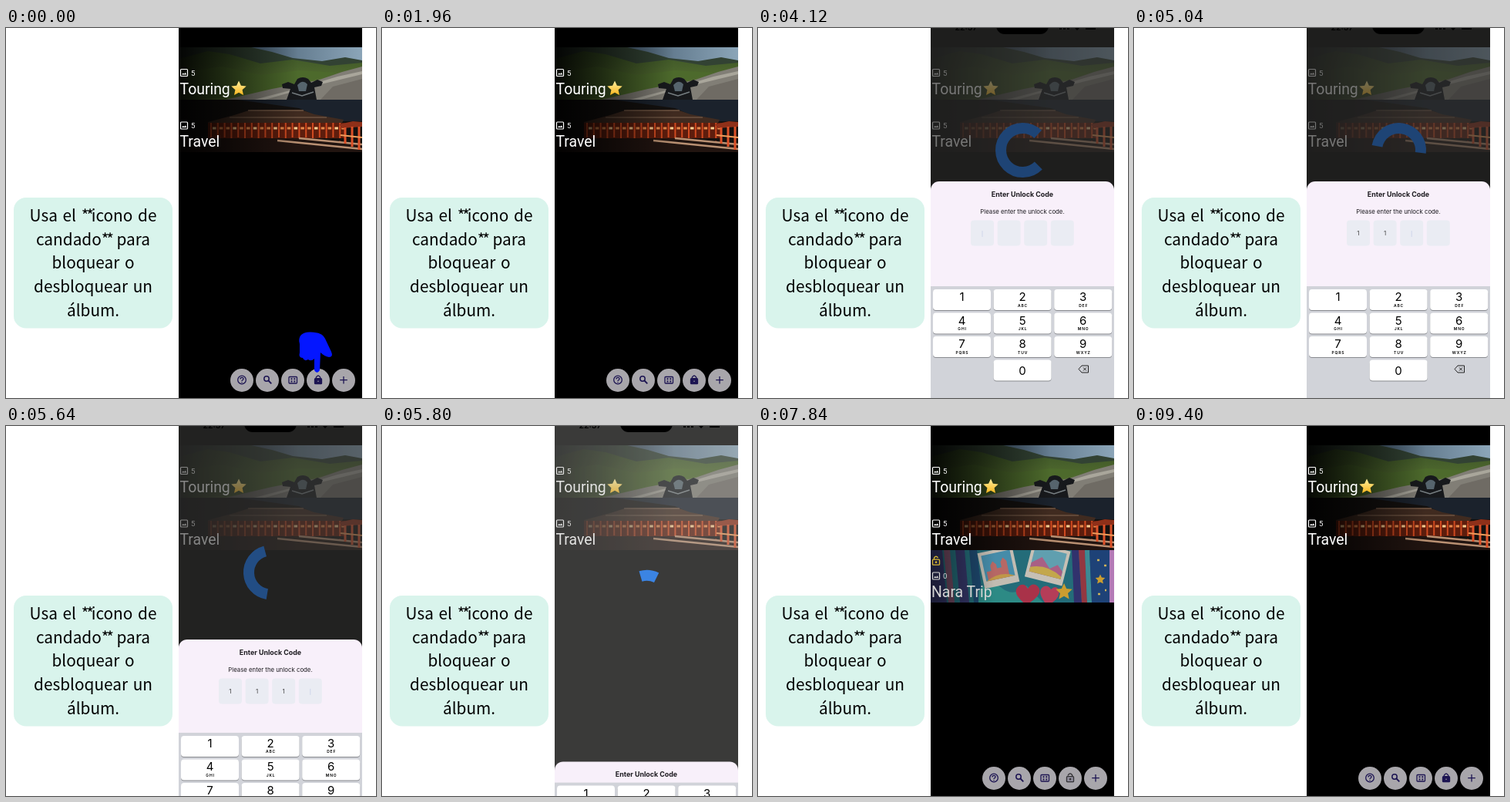
Animation of 480 by 480 pixels, one loop 9.88 s. Source, as an HTML page:

```html
<!DOCTYPE html>
<html lang="es">
<head>
<meta charset="utf-8">
<title>Bloquear un álbum</title>
<style>
html, body { margin: 0; width: 100%; height: 100%; overflow: hidden; background: #fff; }
svg { display: block; width: 100vw; height: 100vh; }
.tip { font: 20.8px "Noto Sans CJK JP", "Noto Sans CJK", "Noto Sans", sans-serif; word-spacing: 2px; text-anchor: middle; }
.stars { letter-spacing: -3.2px; }
.name { font: 19.4px Roboto, sans-serif; fill: #fff; }
.count { font: 9.5px Roboto, sans-serif; fill: #fff; }
.clock { font: 600 10.5px Inter, sans-serif; }
.mid { text-anchor: middle; }
.title { font: 700 8.9px Inter, sans-serif; fill: #1d1b20; }
.hint { font: 7.8px Inter, sans-serif; fill: #1d1b20; }
.digit { font: 8px Inter, sans-serif; fill: #444; }
.key { font: 15px Inter, sans-serif; }
.abc { font: 600 5px Inter, sans-serif; letter-spacing: .8px; }
</style>
</head>
<body>
<svg viewBox="0 0 480 480">
<defs>
  <clipPath id="phone"><rect x="224" width="238" height="480"/></clipPath>
  <clipPath id="row1"><rect x="224" y="25" width="238" height="68"/></clipPath>
  <clipPath id="row2"><rect x="224" y="93" width="238" height="68"/></clipPath>
  <clipPath id="row3"><rect x="224" y="161" width="238" height="68"/></clipPath>
  <linearGradient id="shade">
    <stop offset="0" stop-opacity=".92"/><stop offset=".25" stop-opacity=".6"/><stop offset=".65" stop-opacity="0"/>
  </linearGradient>
  <linearGradient id="shade3">
    <stop offset="0" stop-opacity=".5"/><stop offset=".35" stop-opacity="0"/>
  </linearGradient>
  <linearGradient id="sky"><stop offset=".3" stop-color="#40566a"/><stop offset="1" stop-color="#8ba5b8"/></linearGradient>
  <linearGradient id="grass" x2="0" y2="1"><stop stop-color="#3d5527"/><stop offset="1" stop-color="#5f7a35"/></linearGradient>
  <linearGradient id="gold" x2="0" y2="1"><stop stop-color="#fff0a0"/><stop offset="1" stop-color="#f9b61c"/></linearGradient>
  <path id="star" d="M0-10 2.9-3.7 9.7-3 4.6 1.8 6 8.6 0 5.2-6 8.6-4.6 1.8-9.7-3-2.9-3.7Z"/>
  <g id="photo" fill="none" stroke="#fff" stroke-width="1.2">
    <rect x="-4.5" y="-4.5" width="9" height="9" rx="1"/><path d="M-3 2.6-1.2.2.2 1.8 1.6-.2 3.2 2.6Z" fill="#fff" stroke="none"/>
  </g>
  <g id="lockBody"><rect x="-4.5" y="-1.8" width="9" height="7" rx="1"/></g>
</defs>

<rect x="10" y="220" width="206" height="169.500" rx="16" fill="#d9f4ec"/>
<g class="tip">
  <text x="113" y="251">Usa el <tspan class="stars">**</tspan>icono de</text>
  <text x="113" y="281.700">candado<tspan class="stars">**</tspan> para</text>
  <text x="113" y="312.400">bloquear o</text>
  <text x="113" y="343.200">desbloquear un</text>
  <text x="113" y="374">álbum.</text>
</g>

<g clip-path="url(#phone)">
  <rect x="224" width="238" height="480"/>

  <g clip-path="url(#row1)">
    <rect x="224" y="25" width="238" height="68" fill="url(#sky)"/>
    <path d="M224 25H318L345 31 372 39 410 43 440 38 462 42V93H224Z" fill="#324233"/>
    <path d="M224 40 262 30 290 34 330 46 372 41 420 49 462 45V93H224Z" fill="url(#grass)"/>
    <path d="M224 58 280 50 330 61 380 55 430 58 380 72 300 90 224 93Z" fill="#4d6a2c"/>
    <path d="M462 50 436 57 404 68 345 79 285 93H462Z" fill="#817e76"/>
    <path d="M462 56 430 63 380 78 322 93H336L392 77 462 60Z" fill="#a9a69b"/>
    <path d="M462 66 424 76 408 93H462Z" fill="#6f6b64"/>
    <path d="M358 73 366 70 374 73 378 66Q385 62 392 66L396 71 404 67 411 70 409 75 400 77 403 93H364L369 79 359 78Z" fill="#17191c"/>
    <path d="M378 74Q385 66 391 73L389 82H380Z" fill="#56646d"/>
    <path d="M371 84 384 88 399 83" fill="none" stroke="#777f82" stroke-width="1.500"/>
    <rect x="224" y="25" width="238" height="68" fill="url(#shade)"/>
  </g>

  <g clip-path="url(#row2)">
    <rect x="224" y="93" width="238" height="68" fill="#14110f"/>
    <path d="M300 93H462V121H420L380 104Z" fill="#1b222c"/>
    <path d="M262 122 296 113 318 106H383L400 112 438 119 436 123H262Z" fill="#402b20"/>
    <path d="M314 107H386M290 116H416" stroke="#6b5140" stroke-width="1.500"/>
    <rect x="262" y="123" width="178" height="20" fill="#5e1d0d"/>
    <g id="posts"></g>
    <path d="M262 143H400L462 152V161H224V143Z" fill="#211410"/>
    <path d="M352 146 462 157M380 143 462 151" stroke="#b99072" stroke-width="2.500"/>
    <path d="M432 125 450 121 462 122V128L436 130Z" fill="#8f3019"/>
    <path d="M440 129V150M449 128V154M458 128V158" stroke="#dd5128" stroke-width="3"/>
    <path d="M434 139 462 142" stroke="#ef9c5b" stroke-width="2"/>
    <rect x="224" y="93" width="238" height="68" fill="url(#shade)"/>
  </g>

  <g id="nara">
    <g clip-path="url(#row3)">
      <rect x="224" y="161" width="238" height="68" fill="#2c8291"/>
      <path d="M224 161H239L245 229H224ZM256 161H268L274 229H262Z" fill="#41437f"/>
      <path d="M241 161H249L255 229H247Z" fill="#8b5b78"/>
      <path d="M274 161H284L292 229H280Z" fill="#245683"/>
      <path d="M286 214Q300 197 316 210T348 207L370 229H286Z" fill="#36a6a0"/>
      <g transform="translate(312 184) rotate(-12)">
        <rect x="-23" y="-24" width="46" height="47" fill="#e9e2d6"/>
        <rect x="-19" y="-20" width="38" height="34" fill="#54a8cb"/>
        <path d="M-16 14V2H-10V-5L-6-10-2-5V0H4V-7L8-12 12-7V14Z" fill="#da7d79"/>
        <path d="M-19 14Q0 4 19 14Z" fill="#e5b557"/>
      </g>
      <g transform="translate(375 182) rotate(14)">
        <rect x="-25" y="-26" width="50" height="46" fill="#eee6d9"/>
        <rect x="-21" y="-22" width="42" height="34" fill="#74bfd2"/>
        <path d="M-21 12V0L-9-10 4 2 13-5 21 2V12Z" fill="#c974a0"/>
        <path d="M-21 12V6Q0-3 21 9V12Z" fill="#eac85c"/>
      </g>
      <path d="M348 232Q327 216 339 207 346 203 350 211 356 202 363 208 372 218 348 232Z" fill="#cb3c58"/>
      <path d="M372 229Q361 213 371 208 377 206 380 212 386 206 390 212 393 221 382 229Z" fill="#d8496a"/>
      <use href="#star" transform="translate(397 215) scale(1.1)" fill="#f3bd3a"/>
      <path d="M407 161H416L420 229H410Z" fill="#3b3c83"/>
      <path d="M416 161H424L427 229H420Z" fill="#b1434e"/>
      <path d="M424 161H430L433 229H427Z" fill="#49a6b2"/>
      <path d="M430 161H457V229H433Z" fill="#24508f"/>
      <use href="#star" transform="translate(444 199) scale(.65)" fill="#f3bd3a"/>
      <path d="M440 174h3M449 181h3M441 218h3M450 213h2" stroke="#f5d66e" stroke-width="2.500"/>
      <rect x="456" y="161" width="6" height="68" fill="#d994dd"/>
      <rect x="224" y="161" width="238" height="68" fill="url(#shade3)"/>
    </g>
    <g transform="translate(231 175)" fill="none" stroke="#ffd83b" stroke-width="1.300">
      <use href="#lockBody"/><path d="M-2.500-2V-4Q0-7.500 2.500-4"/><circle cy="1.700" r=".7"/>
    </g>
    <use href="#photo" x="231" y="194.500"/>
    <text class="count" x="240" y="198">0</text>
    <text class="name" x="225" y="222">Nara Trip</text>
  </g>

  <use href="#photo" x="231" y="58"/>
  <text class="count" x="240" y="61.500">5</text>
  <text class="name" x="225.500" y="85.500">Touring</text>
  <use href="#star" x="302" y="78.500" fill="url(#gold)"/>
  <use href="#photo" x="231" y="126.500"/>
  <text class="count" x="240" y="130">5</text>
  <text class="name" x="225.500" y="153.500">Travel</text>

  <g id="buttons" fill="#a8a6ab"></g>
  <g fill="none" stroke="#1c1452" stroke-width="1.300">
    <circle cx="306" cy="456.500" r="5.300"/>
    <path d="M304 455.500Q304 453.300 306 453.300T308 455.300Q308 456.300 306 457.500V458M306 459v1.200"/>
    <circle cx="338" cy="455" r="3.200" stroke-width="1.500"/><path d="M340.500 457.500 344.300 461.300" stroke-width="1.800"/>
    <rect x="367" y="452.500" width="10.500" height="8.500" rx="1"/>
    <path d="M369.500 455.200h2M373.300 455.200h2M369.500 458.500h2M373.300 458.500h2" stroke-width="2"/>
    <path d="M438 452V461.500M433.200 456.700H442.800"/>
    <g transform="translate(405 456.500)">
      <g id="shut"><use href="#lockBody" fill="#1c1452"/><path d="M-2.700-2V-3.300Q0-7.700 2.700-3.300V-2"/><circle cy="1.700" r=".8" fill="#a8a6ab" stroke="none"/></g>
      <g id="open" stroke="#222"><use href="#lockBody"/><path d="M-2.700-3V-3.600Q0-7.700 2.700-3.600V-2"/><circle cy="1.700" r=".7"/></g>
    </g>
  </g>

  <g id="loading">
    <rect x="224" width="238" height="480" fill="#fffffa" opacity=".255"/>
    <path id="spinner" fill="none" stroke="#4294ff" stroke-width="14"/>
    <rect id="scrim" x="224" width="238" height="480"/>
    <text class="clock mid" x="270" y="3">22:37</text>
    <rect x="309" y="-14" width="68" height="22" rx="11"/>
    <path d="M391 0h3v2h-3zM396 0h3v2h-3zM401 0h3v2h-3zM411 0h6l-3 3zM425-3h13v5h-13z"/>
  </g>

  <g id="sheet">
    <rect x="224" width="238" height="500" rx="11" fill="#f8f0fa"/>
    <text class="title mid" x="343" y="20">Enter Unlock Code</text>
    <text class="hint mid" x="343" y="42">Please enter the unlock code.</text>
    <g id="cells"></g>
  </g>
  <g id="keyboard">
    <rect x="224" width="238" height="150" fill="#d1d3d9"/>
    <g id="keys"></g>
    <path d="M416 107.500 420 103H428.500V112H420ZM422 105.500 426 109.500M426 105.500 422 109.500" fill="none" stroke="#222"/>
  </g>

  <path id="hand" fill="#0416ff" d="M381 410C378 399 385 394 395 394.500 406 395 411 397 414 403L422 420Q425 427 419 427 413 426 408 421L407 444Q403.500 450 400 444V429Q396 433 392 430 387 433 385 428 379 428 381 421Z"/>
</g>
</svg>

<script>
const LOOP = 9880, STEP = 40;
const $ = id => document.getElementById(id);
const fill = (id, n, make) => $(id).innerHTML = Array.from({ length: n }, (_, i) => make(i)).join("");

fill("posts", 20, i => {
  const x = 266 + i * 8.8;
  return `<path d="M${x} 123V${142 + i % 2}" stroke="#d04a20" stroke-width="2"/>
    <path d="M${x + 2} 130h4.500" stroke="${i % 3 ? "#e8894a" : "#ffd091"}" stroke-width="3"/>
    <path d="M${x} 146v${5 + i % 4 * 2}" stroke="#672312" stroke-width="2"/>`;
});
fill("buttons", 5, i => `<circle cx="${306 + 33 * i}" cy="457" r="15"/>`);
fill("cells", 4, i => {
  const x = 276 + 34.6 * i;
  return `<rect x="${x}" y="50.500" width="30" height="33" rx="4" fill="#eaecf3"/>
    <text class="digit mid" x="${x + 15}" y="70">1</text>
    <path class="caret" d="M${x + 15} 64v8" stroke="#cfd6ea"/>`;
});
const letters = ["", "ABC", "DEF", "GHI", "JKL", "MNO", "PQRS", "TUV", "WXYZ"];
fill("keys", 10, i => {
  const col = i < 9 ? i % 3 : 1, x = 227 + 78.6 * col, y = 4 + 30.5 * Math.floor(i / 3);
  return `<rect x="${x}" y="${y + 1}" width="75" height="27" rx="4" fill="#898b90"/>
    <rect x="${x}" y="${y}" width="75" height="27" rx="4" fill="#fff"/>
    <text class="key mid" x="${x + 37.5}" y="${y + (i < 9 ? 15 : 19)}">${(i + 1) % 10}</text>
    <text class="abc mid" x="${x + 38}" y="${y + 22.5}">${letters[i] || ""}</text>`;
});
const digits = document.querySelectorAll(".digit"), carets = document.querySelectorAll(".caret");

// Steps are [time, value] pairs, joined by straight lines.
function track(steps, t) {
  const i = steps.findIndex(s => s[0] > t);
  if (i < 0) return steps[steps.length - 1][1];
  if (!i) return steps[0][1];
  const [a, v] = steps[i - 1], [b, w] = steps[i];
  return v + (w - v) * (t - a) / (b - a);
}
const sheetUp = [[3440, 0], [3520, .32], [3600, .66], [3680, .87], [3760, .96], [3840, 1], [5560, 1], [5640, .89], [5720, .55], [5800, .2], [5880, 0]];
const keysUp = [[3640, 0], [3720, .22], [3800, .55], [3880, .8], [3960, .92], [4040, .98], [4120, 1], [5480, 1], [5560, .84], [5640, .566], [5720, .31], [5800, .12], [5920, 0]];
const album = [[5960, 0], [6120, 1], [7760, 1], [8240, 0]];
const handFade = [[480, 1], [1440, 0]];
const typed = [4640, 4880, 5120];

// Cubic curve (.4, 0, .2, 1), solved by bisection.
function ease(x) {
  x = Math.min(1, Math.max(0, x));
  let lo = 0, hi = 1;
  for (let i = 0; i < 20; i++) {
    const m = (lo + hi) / 2, n = 1 - m;
    if (1.2 * n * n * m + .6 * n * m * m + m ** 3 < x) lo = m; else hi = m;
  }
  return lo * lo * (3 - 2 * lo);
}

function arc(t, cy) {
  const p = (.13 + (t - 3600) / 1333 + 1) % 1;
  const tail = ease(2 * p - 1);
  const from = -12 + .19 * (t - 3600) + 90 * p + 270 * tail;
  const sweep = Math.max(1, 270 * (ease(2 * p) - tail));
  const at = deg => {
    const a = deg * Math.PI / 180;
    return `${343.5 + 28.5 * Math.sin(a)} ${cy - 28.5 * Math.cos(a)}`;
  };
  return `M${at(from)}A28.5 28.5 0 ${sweep > 180 ? 1 : 0} 1 ${at(from + sweep)}`;
}

const show = (el, on) => el.setAttribute("visibility", on ? "visible" : "hidden");
const move = (id, y) => $(id).setAttribute("transform", `translate(0 ${y})`);

function draw(now) {
  const t = Math.floor(now % LOOP / STEP) * STEP;
  const s = track(sheetUp, t), k = track(keysUp, t), a = track(album, t), h = track(handFade, t);
  const keyTop = 480 - 145 * k;

  $("hand").setAttribute("opacity", h);
  $("hand").setAttribute("transform", `translate(401.5 420) scale(${1.18 - .18 * h}) translate(-401.5 -420)`);

  show($("loading"), t >= 3400 && t < 6000);
  $("scrim").setAttribute("opacity", .54 * s);
  $("spinner").setAttribute("d", arc(t, keyTop / 2 - 9));
  move("sheet", keyTop - 136 * s);
  move("keyboard", keyTop);
  show($("sheet"), s > 0);
  show($("keyboard"), k > 0);

  const n = typed.filter(x => t >= x).length;
  digits.forEach((d, i) => show(d, s > 0 && i < n));
  carets.forEach((c, i) => show(c, k > 0 && i === n));

  $("nara").setAttribute("opacity", a);
  $("open").setAttribute("opacity", a);
  $("shut").setAttribute("opacity", 1 - a);
}

function tick() {
  draw(performance.now());
  requestAnimationFrame(tick);
}
tick();
</script>
</body>
</html>
```
